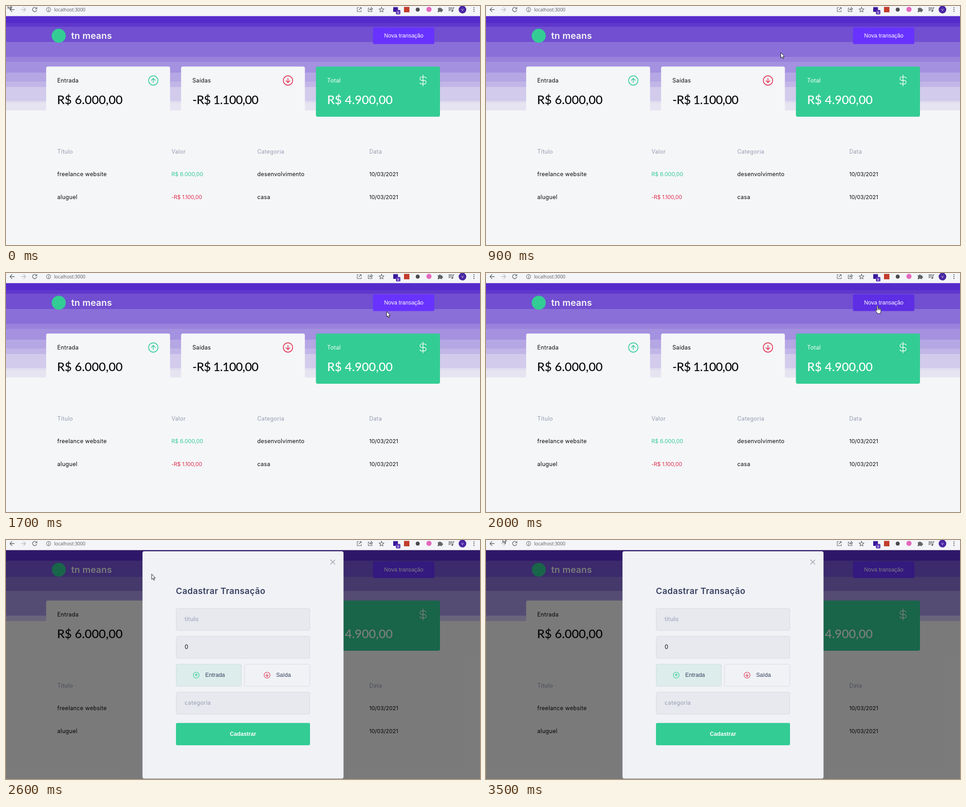
An HTML page for the animation above (5 s loop, 1054 by 531 pixels).

```html
<!DOCTYPE html>
<html lang="pt-BR">
<head>
<meta charset="utf-8">
<title>Transações</title>
<style>
  html, body { margin: 0; width: 100%; height: 100%; overflow: hidden; background: #f5f6f8; }
  svg { display: block; width: 1054px; height: 531px; }
  text { font: 400 12.5px Inter, sans-serif; letter-spacing: .3px; fill: #0b0b0e; }
  .num { font-size: 12.2px; letter-spacing: 0; }
  .head text, .hint { fill: #969cb2; }
  .big { font: 500 27px Lato, sans-serif; letter-spacing: 0; }
  .neg { letter-spacing: -.8px; }
  .ui { font-family: "Liberation Sans", Arial, sans-serif; letter-spacing: 0; }
  .bold { font-weight: 700; }
  .white { fill: #fff; }
  .brand { font-weight: 600; font-size: 20px; letter-spacing: .2px; fill: #f5f6f8; }
  .url { font: 10.3px "Open Sans", sans-serif; letter-spacing: 0; fill: #55595e; }
  .title { font-weight: 600; font-size: 18.8px; letter-spacing: .5px; fill: #363f5f; }
  .plain { font: 700 18.8px "Liberation Sans", Arial, sans-serif; letter-spacing: 0; }
  .ink { fill: #363f5f; }
  .line { fill: none; stroke: #5f6368; stroke-width: 1.3; }
  .round { fill: none; stroke-linecap: round; stroke-linejoin: round; }
  .field rect { fill: #e7e9ee; stroke: #d7d9df; }
</style>
</head>
<body>
<svg viewBox="0 0 1054 531" xmlns="http://www.w3.org/2000/svg">
  <defs>
    <g id="up" class="round">
      <circle r="10.4"/>
      <path d="M0 4.6V-4.6M-4.4 -.3L0 -4.7 4.4 -.3"/>
    </g>
  </defs>

  <rect width="1054" height="531" fill="#f5f6f8"/>
  <g id="light"></g>
  <g id="dark"></g>

  <g id="page">
    <circle cx="117.3" cy="66" r="15.6" fill="#33cc95"/>
    <text class="brand" x="145" y="72.5">tn means</text>
    <rect id="newBtn" x="816" y="47.5" width="136.5" height="37" rx="3"/>
    <text class="ui white" x="840.7" y="70">Nova transação</text>

    <rect x="89.3" y="134.5" width="275.5" height="111.5" rx="4" fill="#f5f6f8"/>
    <rect x="389.3" y="134.5" width="275.3" height="111.5" rx="4" fill="#f5f6f8"/>
    <rect x="689.2" y="134.5" width="275.8" height="111.5" rx="4" fill="#33cc95"/>
    <text x="114" y="170">Entrada</text>
    <text x="414.5" y="170">Saídas</text>
    <text class="white" x="714" y="170">Total</text>
    <text class="big" x="113.5" y="217.8">R$ 6.000,00</text>
    <text class="big neg" x="414.5" y="217.8">-R$ 1.100,00</text>
    <text class="big white" x="714" y="217.8">R$ 4.900,00</text>
    <use href="#up" x="327.5" y="165.5" stroke="#33cc95" stroke-width="1.6"/>
    <use href="#up" transform="translate(627 165.5) scale(1 -1)" stroke="#e0304f" stroke-width="1.6"/>
    <path class="round" transform="translate(913.9 152) scale(1.12)" stroke="#fff" stroke-width="1.25"
      d="M12 1V23M18 7.5C18 5.8 16.6 5 14.5 5H9.5a3.5 3.5 0 0 0 0 7h5a3.5 3.5 0 0 1 0 7H9.5C7.4 19 6 18.2 6 16.5"/>

    <g class="head">
      <text x="114" y="328">Título</text>
      <text x="368" y="328">Valor</text>
      <text x="558.7" y="328">Categoria</text>
      <text x="807.7" y="328">Data</text>
    </g>
    <text x="114" y="378">freelance website</text>
    <text class="num" x="367.7" y="378" style="fill:#33cc95">R$ 6.000,00</text>
    <text x="558.7" y="378">desenvolvimento</text>
    <text class="num" x="807.7" y="378">10/03/2021</text>
    <text x="114" y="428.5">aluguel</text>
    <text class="num neg" x="367.7" y="428.5" style="fill:#e0304f;letter-spacing:-.2px">-R$ 1.100,00</text>
    <text x="558.7" y="428.5">casa</text>
    <text class="num" x="807.7" y="428.5">10/03/2021</text>
  </g>

  <g id="modal">
    <rect y="22" width="1054" height="509" fill="#000" fill-opacity=".5"/>
    <rect id="sheet" x="303.5" width="447" rx="4" fill="#f0f2f6"/>
    <text id="title" class="title" x="377.8" y="119.5">Cadastrar Transação</text>
    <g id="form">
      <g class="field">
        <rect x="378.5" y="149.5" width="297" height="49" rx="3"/>
        <rect x="378.5" y="211.5" width="297" height="49" rx="3"/>
        <rect x="378.5" y="273.5" width="145" height="49" rx="3" style="fill:#dcedeb"/>
        <rect x="530.5" y="273.5" width="145" height="49" rx="3" style="fill:#f0f2f6"/>
        <rect x="378.5" y="335.5" width="297" height="49" rx="3"/>
      </g>
      <text class="hint" x="397.3" y="178">titulo</text>
      <text x="397.3" y="240">0</text>
      <text class="ui ink" x="443" y="302">Entrada</text>
      <text class="ui ink" x="600.7" y="302">Saída</text>
      <text class="hint" x="397.3" y="364">categoria</text>
      <rect x="378" y="404" width="298" height="49.5" rx="3" fill="#33cc95"/>
      <text class="ui bold white" x="527" y="432.3" text-anchor="middle">Cadastrar</text>
    </g>
    <g id="icons">
      <use href="#up" transform="translate(423 300.3) scale(.63)" stroke="#33cc95" stroke-width="1.8"/>
      <use href="#up" transform="translate(580.5 300.3) scale(.63 -.63)" stroke="#e0304f" stroke-width="1.8"/>
      <path d="M721.8 44.2l9.6 9.6m0-9.6l-9.6 9.6" class="round" stroke="#9b9fa8" stroke-width="1.4"/>
    </g>
  </g>

  <g id="bar">
    <rect width="1054" height="22.5" fill="#f4f5f8"/>
    <path class="line" d="M19 8H9M13.8 3L8.8 8l5 5"/>
    <path class="line" d="M33.5 8H43.5M38.8 3l5 5-5 5" style="stroke:#b9bcc0"/>
    <path class="line" d="M67.3 4.8A4.7 4.7 0 1 0 68.3 9M68.6 2.6V6.4H64.6"/>
    <circle class="line" cx="94.7" cy="8" r="4.6" style="stroke-width:1.1"/>
    <path class="line" d="M94.7 7.2V10.8M94.7 5V6.3"/>
    <text class="url" x="107" y="11.5">localhost:3000</text>
    <path class="line" style="stroke-width:1.1" d="M784.5 3.5H781V12.5H790V9M786.5 3.5H790V7M790 3.5L784.5 9"/>
    <path class="line" style="stroke-width:1.1" d="M808 4.5H805.5V12.5H814V10M808 9.5C808.5 7 810 5.7 812 5.7V3.2L815.3 6.5 812 9.5V7.5C810.2 7.5 809 8.2 808 9.5Z"/>
    <path class="line" style="stroke-width:1.1" d="M835 2.8l1.5 3.6 3.9.3-3 2.5.9 3.8-3.3-2-3.3 2 .9-3.8-3-2.5 3.9-.3Z"/>
    <rect x="861" y="2.5" width="10.5" height="10.5" fill="#3a1799"/>
    <rect x="867" y="8.7" width="10" height="10" rx="2" fill="#5a35b5"/>
    <text class="ui white" x="872" y="16.7" text-anchor="middle" style="font-size:8px">8</text>
    <rect x="885" y="2" width="12" height="12" fill="#c43c2c"/>
    <circle cx="915.5" cy="8" r="4.5" fill="#4a4c50"/>
    <circle cx="940.5" cy="7.5" r="5.7" fill="#e468bd"/>
    <path fill="#5f6368" d="M960 5H963A1.8 1.8 0 1 1 966.6 5H969.5V7.6A1.8 1.8 0 1 1 969.5 11V13.5H966.5A1.7 1.7 0 0 0 963.2 13.5H960V10.5A1.7 1.7 0 0 0 960 7.3Z"/>
    <path class="line" d="M984 4H992M984 7H992M984 10H988.5M993.8 11V4H997"/>
    <circle cx="992.2" cy="11" r="2" fill="#5f6368"/>
    <circle cx="1015" cy="8" r="8.5" fill="#4a27a3"/>
    <text class="ui white" x="1015" y="10.7" text-anchor="middle" style="font-size:7.5px">V</text>
    <g fill="#5f6368"><circle cx="1040.5" cy="4" r="1.2"/><circle cx="1040.5" cy="8" r="1.2"/><circle cx="1040.5" cy="12" r="1.2"/></g>
  </g>

  <g id="cursor" stroke="#15151c" stroke-width="1" stroke-linejoin="round" fill="#fff">
    <path id="arrow" d="M.5 .5V12.6L3.2 10 5 14.4 7 13.5 5.2 9.3H8.6Z"/>
    <path id="hand" d="M.6 1.8a1.3 1.3 0 0 1 2.6 0V7a1.2 1.2 0 0 1 2.2.2 1.2 1.2 0 0 1 2.2.4 1.1 1.1 0 0 1 2 .8V12.5C9.6 14.5 8.6 15.2 8.4 18H1.6C1.4 15.8-.8 14-2.3 11.3-3 9.9-1.6 9.1-.6 10.2L.6 11.5ZM3.2 7V10.5M5.4 7.3V10.5M7.6 8V10.7"/>
  </g>
</svg>
<script>
const LOOP = 5000, STEP = 100;
const $ = id => document.getElementById(id);

// each band: top edge, colour; it runs to the next top edge
function bands(id, list, end) {
  list.forEach(([y, fill], i) => {
    const r = document.createElementNS("http://www.w3.org/2000/svg", "rect");
    const bottom = i + 1 < list.length ? list[i + 1][0] : end;
    const attrs = { y, fill, width: 1054, height: bottom - y };
    for (const k in attrs) r.setAttribute(k, attrs[k]);
    $(id).append(r);
  });
}
bands("light", [[22, "#552bcb"], [38, "#5f38cc"], [46, "#714fd0"], [80, "#8b6fd8"],
  [113, "#9a82dc"], [124, "#a491e0"], [148, "#b5a6e4"], [168, "#c1b6e7"],
  [180, "#d2cbec"], [211, "#dfdbef"], [215, "#e7e4f1"]], 232);
bands("dark", [[22, "#5c2ed2"], [46, "#7654da"], [82, "#8c72d8"],
  [113, "#ac9aea"], [168, "#d4caf8"], [180, "#f5f6f8"]], 232);

// pointer tip: time, x, y
const path = [
  [0, 4, -7], [200, 4, -7], [300, 60, 6], [400, 190, 44], [500, 326, 72], [600, 410, 86],
  [700, 510, 96], [800, 591, 101], [900, 655, 103], [1000, 728, 100], [1100, 778, 95],
  [1200, 797, 92], [1300, 797, 92], [1400, 817, 90], [1500, 835, 88], [1600, 835, 88],
  [1700, 846, 85], [1800, 857, 78], [2000, 868.5, 72], [2300, 866, 73], [2400, 750, 77],
  [2500, 530, 79], [2600, 323.5, 75], [2700, 323.5, 75], [2900, 230, 53],
  [3100, 112, 21], [3300, 54, 0], [3500, 37, -7], [LOOP, 37, -7]
];

function tip(t) {
  const i = path.findIndex(p => p[0] > t);
  const [t0, x0, y0] = path[i - 1], [t1, x1, y1] = path[i];
  const k = (t - t0) / (t1 - t0);
  return [x0 + (x1 - x0) * k, y0 + (y1 - y0) * k];
}

const show = (id, on) => $(id).setAttribute("visibility", on ? "visible" : "hidden");

function draw(now) {
  const t = Math.floor((now % LOOP) / STEP) * STEP;
  const open = t >= 2200, ready = t >= 2300, over = t >= 1800 && !open;
  const [x, y] = tip(t);
  $("cursor").setAttribute("transform", `translate(${x} ${y})`);
  show("arrow", !over);
  show("hand", over);
  $("newBtn").setAttribute("fill", t >= 1800 && t < 2400 ? "#5e2ee5" : "#6933ff");
  show("light", !open);
  show("dark", open);
  show("modal", open);
  show("icons", ready);
  $("sheet").setAttribute("y", ready ? 25 : 28);
  $("sheet").setAttribute("height", ready ? 505 : 500);
  $("title").setAttribute("class", ready ? "title" : "title plain");
  $("form").setAttribute("transform", `translate(0 ${ready ? 2.4 : 0})`);
}

const start = performance.now();
function tick() {
  draw(performance.now() - start);
  requestAnimationFrame(tick);
}
tick();
</script>
</body>
</html>
```
